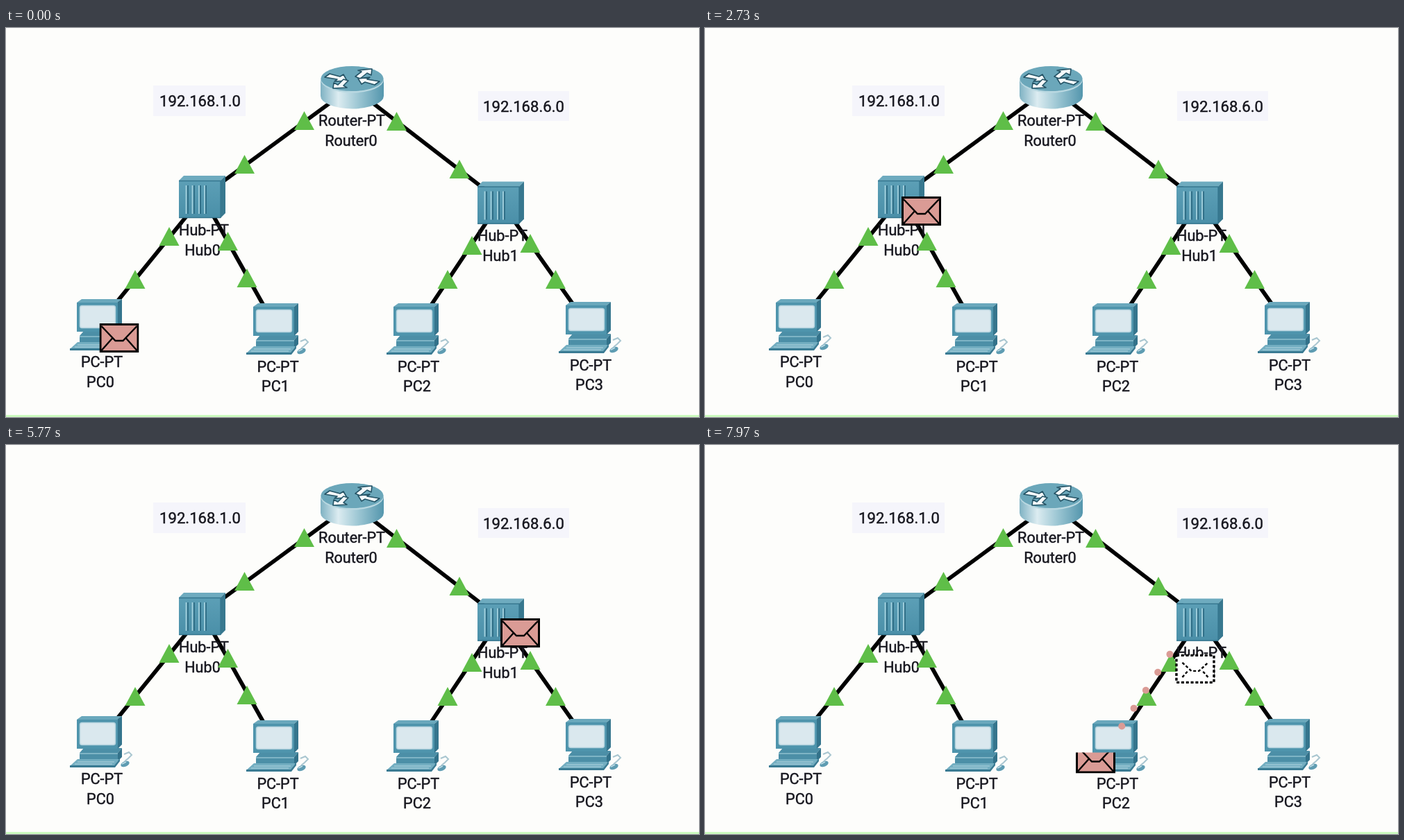
These frames come from a looping animation (998x561 px, 8 s). An HTML page:

```html
<!DOCTYPE html>
<html lang="en">
<head>
<meta charset="utf-8">
<title>Packet simulation</title>
<style>
  html, body { margin: 0; width: 100%; height: 100%; overflow: hidden; background: #fdfdfb; }
  #stage { display: block; width: 100vw; height: 100vh; }
  text { font-family: Roboto, "Liberation Sans", sans-serif; font-size: 21.6px; fill: #17171f; stroke: #17171f; stroke-width: .45px; text-anchor: middle; }
  .ip { font-size: 22.1px; }
</style>
</head>
<body>
<svg id="stage" viewBox="0 0 998 561" preserveAspectRatio="none">
  <defs>
    <linearGradient id="side">
      <stop offset="0" stop-color="#7fb2c3"/>
      <stop offset=".28" stop-color="#dcecf1"/>
      <stop offset=".6" stop-color="#9cc6d3"/>
      <stop offset="1" stop-color="#5496ad"/>
    </linearGradient>
    <linearGradient id="front" x2="0" y2="1">
      <stop offset="0" stop-color="#5c9fb6"/>
      <stop offset="1" stop-color="#4a8fa8"/>
    </linearGradient>
    <g id="router">
      <path d="M453 75V98A45.5 18.5 0 0 0 544 98V75Z" fill="url(#side)"/>
      <ellipse cx="498.5" cy="74.500" rx="45.5" ry="19" fill="#b9d8e1"/>
      <ellipse cx="498.5" cy="73" rx="45" ry="18" fill="#6ba7ba"/>
      <g fill="#f4fafc" stroke="#245365" stroke-width="1.6" stroke-linejoin="round">
        <path d="M459 71L466 66L481 70L486 67L491 76L473 77L477 74Z"/>
        <path d="M503 70L512 63L507 61L527 59L526 68L520 65L510 73Z"/>
        <path d="M493 76L486 83L491 86L471 87L472 79L478 82L486 74Z"/>
        <path d="M538 77L531 82L517 78L512 81L507 73L524 71L520 74Z"/>
      </g>
    </g>
    <g id="hub">
      <path d="M249 220L256 213H316L309 220Z" fill="#6eabbf"/>
      <path d="M309 220L316 213V267L309 274Z" fill="#38788f"/>
      <path d="M249 220H309V274H249Z" fill="url(#front)"/>
      <path d="M249 220.500H309V274M249 273.5H309" fill="none" stroke="#35768e" stroke-width="1.3"/>
      <path d="M259.500 227V268M268.500 227V268M278 227V268M286 227V268" stroke="#a3d0dd" stroke-width="1.8"/>
      <path d="M262 227V268M271 227V268M280 227V268M288 227V268" stroke="#2e6c84" stroke-width="1.8"/>
    </g>
    <g id="pc">
      <path d="M106 444L112 437H167L161 444V456H106Z" fill="#4c8fa7"/>
      <path d="M161 444L167 437V450L161 456Z" fill="#33728a"/>
      <path d="M106 445H161" stroke="#8fc0cf" stroke-width="1.5"/>
      <path d="M103 453H163L156 463H92Z" fill="#73aec1"/>
      <path d="M92 462H156L164 452V456L157 465H92Z" fill="#3a7b93"/>
      <path d="M103 457H156M99 460H153" stroke="#b0d3de" stroke-width="1"/>
      <path d="M102 396L109 391H167L161 396Z" fill="#6aa8bc"/>
      <path d="M161 396L167 391V432L161 438Z" fill="#35758d"/>
      <rect x="102" y="396" width="59" height="42" fill="#4e94ac"/>
      <rect x="106.500" y="400.500" width="51" height="32" rx="3" fill="#dae8ee" stroke="#b5d3de" stroke-width="1.5"/>
      <path d="M170 446L177 443L181 447L176 452L171 456" fill="none" stroke="#a9c6d0" stroke-width="2"/>
      <ellipse cx="171.500" cy="460" rx="6.500" ry="3.800" fill="#5e9cb2" transform="rotate(-22 171.500 460)"/>
      <path d="M167 460L173 457" stroke="#c5dfe7" stroke-width="1.5"/>
    </g>
  </defs>
  <rect width="998" height="561" fill="#fdfdfb"/>
  <rect y="558" width="998" height="3" fill="#ccfbbf"/>
  <g id="scene"></g>
  <g id="packets"></g>
</svg>
<script>
const LOOP = 8000, TICK = 30, HOPS = 7, W = 57, H = 42, DRAIN = 3;
const PINK = '#da9b95';
const LAST = HOPS + 1 + H / DRAIN;

const nodes = {
  router: [498, 85], hub0: [283, 243], hub1: [712, 250],
  pc0: [134.5, 426], pc1: [388.5, 431.5], pc2: [591, 431.5], pc3: [838.5, 429.5]
};
const links = ['router hub0', 'router hub1', 'hub0 pc0', 'hub0 pc1', 'hub1 pc2', 'hub1 pc3'];

// Each hop: start time, sender, receivers with the trail offset.
const legs = [
  { at: 1555, from: 'pc0', to: [{ id: 'hub0', off: [-8, 0] }] },
  { at: 3015, from: 'hub0', to: [{ id: 'pc1', off: [-1, -8], drop: true }, { id: 'router', off: [-6, -7] }] },
  { at: 4660, from: 'router', to: [{ id: 'hub1', off: [-3, -7] }] },
  { at: 6305, from: 'hub1', to: [{ id: 'pc2', off: [-8, 0] }, { id: 'pc3', off: [-1, -7], drop: true }] },
  { at: 7805, from: 'pc2', to: [{ id: 'hub1', off: [-8, 0] }] }
];

const use = (id, x = 0, y = 0) => `<use href="#${id}" x="${x}" y="${y}"/>`;
const label = (s, x, y, cls = '') => `<text class="${cls}" x="${x}" y="${y}">${s}</text>`;
const line = ([x1, y1], [x2, y2]) => `<path d="M${x1} ${y1}L${x2} ${y2}" stroke="#000" stroke-width="5.800"/>`;
const arrow = ([x, y]) => `<path d="M${x} ${y}l14.500 27h-29z" fill="#5fbe48"/>`;
const plate = (x, y, w, h) => `<rect x="${x}" y="${y}" width="${w}" height="${h}" fill="#f5f5fb"/>`;

const arrows = [
  [429.5, 120], [343.5, 183], [562.5, 121], [653, 190], [235, 287], [186, 349],
  [319.5, 294], [347, 347], [671, 300], [636, 349], [755, 297], [791.5, 349]
];

document.getElementById('scene').innerHTML = [
  ...links.map(l => line(...l.split(' ').map(id => nodes[id]))),
  use('router'), use('hub'), use('hub', 430, 8.5),
  use('pc'), use('pc', 254, 6), use('pc', 456, 6), use('pc', 704, 4),
  plate(212, 83, 133, 44), label('192.168.1.0', 279.5, 113, 'ip'),
  plate(680, 91, 131, 43), label('192.168.6.0', 745.5, 121, 'ip'),
  label('Router-PT', 498, 141), label('Router0', 497, 170),
  label('Hub-PT', 285, 299), label('Hub0', 283, 328),
  label('Hub-PT', 715, 307), label('Hub1', 712, 335.5),
  label('PC-PT', 138, 489), label('PC0', 136, 517.5),
  label('PC-PT', 391.5, 495.5), label('PC1', 388, 524),
  label('PC-PT', 594, 495.5), label('PC2', 592, 524),
  label('PC-PT', 842, 493.5), label('PC3', 840, 522),
  ...arrows.map(arrow)
].join('');

const FLAP = 'M3 4L23 25H34L54 4M3 39L19 21M54 39L38 21';
const SLASH = '<path d="M4 32L31 5L36 10L9 37Z" fill="#e9481f" stroke="#7d2413" stroke-width="1.5"/>';

// Solid envelope, showing only the rows from top to bottom.
function envelope([x, y], top = 0, bottom = H, extra = '') {
  if (bottom <= top) return '';
  return `<svg x="${x}" y="${y + top}" width="${W}" height="${bottom - top}" viewBox="0 ${top} ${W} ${bottom - top}">
    <rect x="1.500" y="1.500" width="${W - 3}" height="${H - 3}" fill="${PINK}" stroke="#000" stroke-width="3"/>
    <path d="${FLAP}" fill="none" stroke="#000" stroke-width="2.400"/>${extra}</svg>`;
}

const ghost = ([x, y]) => `<g transform="translate(${x} ${y})" stroke="#000" stroke-dasharray="4 2.800">
  <rect x="1.500" y="1.500" width="${W - 3}" height="${H - 3}" fill="#fff" stroke-width="3.400"/>
  <path d="M10 12L23 24H34L47 12M10 33L18 24M47 33L39 24" fill="none" stroke-width="2.400"/></g>`;

const dot = ([x, y]) => `<circle cx="${x}" cy="${y}" r="5" fill="${PINK}"/>`;
const clamp = v => Math.max(0, Math.min(H, v));

function drawLeg(leg, k) {
  const [fx, fy] = nodes[leg.from];
  let trail = '', mail = envelope([fx - W, fy], clamp(DRAIN * (k - 1)));
  for (const { id, off, drop } of leg.to) {
    const [tx, ty] = nodes[id];
    const spot = i => [fx + (tx - fx) * i / HOPS, fy + (ty - fy) * i / HOPS];
    for (let i = 1; i <= HOPS; i++) {
      if (i > k || k >= H / DRAIN + 1 + i) continue;
      const [x, y] = spot(i);
      trail += dot([x + off[0], y + off[1]]);
    }
    if (k >= 1 && k <= HOPS) mail += ghost(spot(k));
    mail += envelope([tx, ty], 0, clamp(DRAIN * (k - HOPS - 1)), drop && k >= LAST ? SLASH : '');
  }
  return trail + mail;
}

const layer = document.getElementById('packets');
let shown = '';

function render(t) {
  const leg = legs.filter(l => l.at <= t).pop();
  const k = leg ? Math.min(LAST, Math.floor((t - leg.at) / TICK)) : 0;
  const key = leg ? leg.at + ':' + k : 'idle';
  if (key === shown) return;
  shown = key;
  layer.innerHTML = leg ? drawLeg(leg, k) : envelope(nodes.pc0);
}

const start = performance.now();
function frame() {
  render((performance.now() - start) % LOOP);
  requestAnimationFrame(frame);
}
frame();
</script>
</body>
</html>
```
